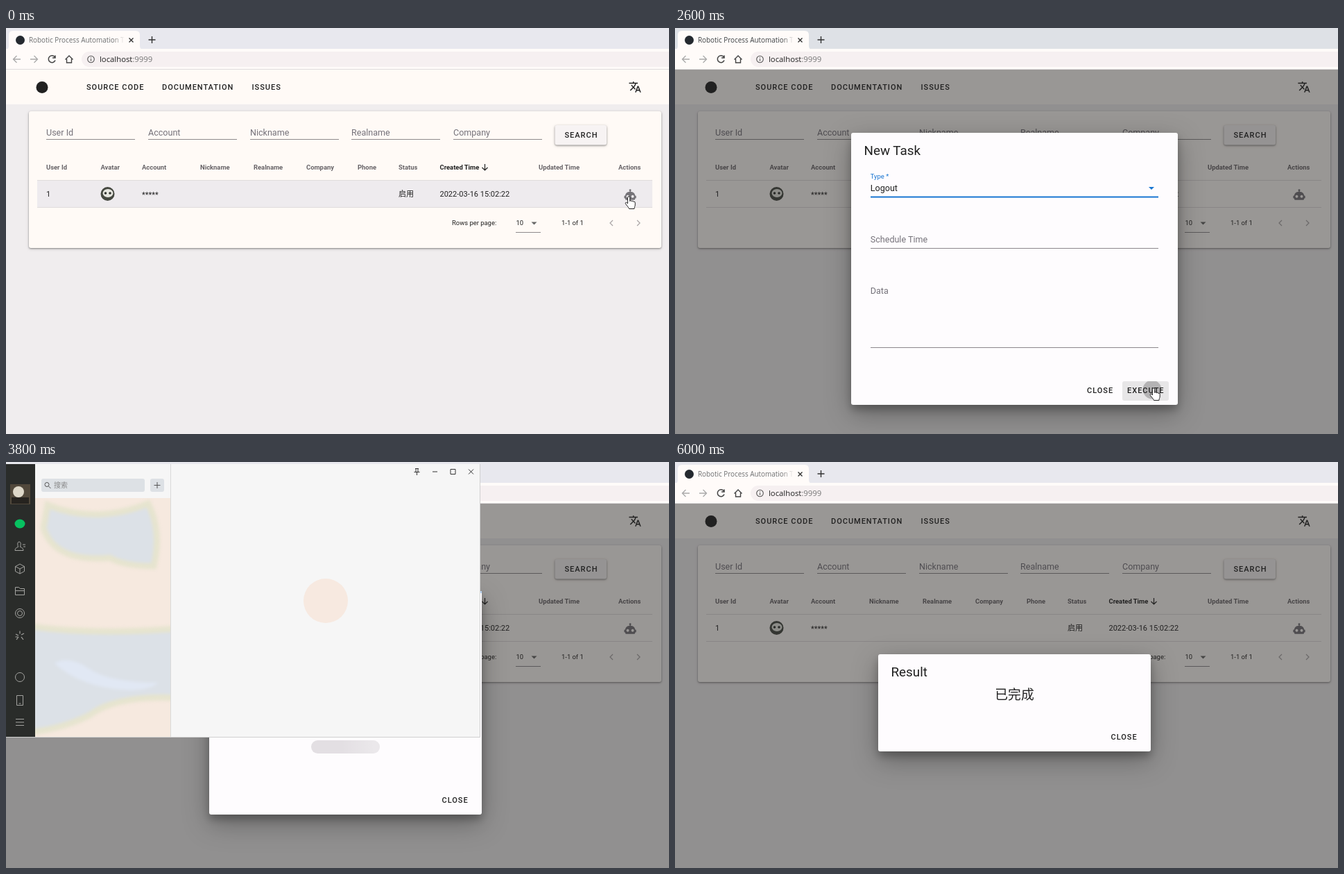
Animation of 956x585 px, one loop 8 s. Source, as an HTML page:

```html
<!DOCTYPE html>
<html lang="en">
<head>
<meta charset="utf-8">
<title>Robotic Process Automation</title>
<style>
html, body { margin: 0; height: 100%; overflow: hidden; background: #f0edee; }
svg { display: block; width: 100vw; height: 100vh; }
text { font-family: Roboto, "Noto Sans CJK SC", "Noto Sans CJK", sans-serif; white-space: pre; }
.ui { font-family: "Open Sans", "Noto Sans CJK SC", "Noto Sans CJK", sans-serif; }
.btn { font-weight: 500; letter-spacing: .98px; }
.card { filter: drop-shadow(0 1px 1px rgba(0,0,0,.38)) drop-shadow(0 1px 2px rgba(0,0,0,.14)); }
.paper { filter: drop-shadow(0 7px 6px rgba(0,0,0,.24)) drop-shadow(0 11px 18px rgba(0,0,0,.3)); }
.menu { filter: drop-shadow(0 3px 4px rgba(0,0,0,.3)); }
.soft { filter: blur(2px); }
</style>
</head>
<body>
<svg id="stage" viewBox="0 0 956 585"></svg>
<script>
const $ = id => document.getElementById(id);
const INK = '#212121', GREY = '#75727a', BLUE = '#1976d2';

// Markup helpers; text is placed by the middle of its capitals
const text = (x, y, size, str, fill = INK, more = '') =>
  `<text x="${x}" y="${y + size * .356}" font-size="${size}" fill="${fill}" ${more}>${str}</text>`;
const rect = (x, y, w, h, fill, more = '') =>
  `<rect x="${x}" y="${y}" width="${w}" height="${h}" fill="${fill}" ${more}/>`;
const line = (d, stroke, width = 1, more = '') =>
  `<path d="${d}" fill="none" stroke="${stroke}" stroke-width="${width}" ${more}/>`;
const shape = (d, fill, more = '') => `<path d="${d}" fill="${fill}" ${more}/>`;
const disc = (x, y, r, fill, more = '') => `<circle cx="${x}" cy="${y}" r="${r}" fill="${fill}" ${more}/>`;
const ring = (x, y, r, stroke, width = 1) => disc(x, y, r, 'none', `stroke="${stroke}" stroke-width="${width}"`);
const button = (x, y, str, more = '') => text(x, y, 11, str, INK, `class="btn" ${more}`);
const title = (x, y, str) => text(x, y, 18.84, str);
const label = (x, y, str, more = '') => text(x, y, 12.56, str, GREY, more);
const icon = (x, y, d, fill) => shape(d, fill, `transform="translate(${x - 9.4} ${y - 9.4}) scale(.785)" fill-rule="evenodd"`);
const group = (id, body, more = '') => `<g id="${id}" ${more}>${body}</g>`;

const ROBOT = 'M12 2a2 2 0 0 1 1 3.7V7h1a7 7 0 0 1 7 7h1a1 1 0 0 1 1 1v3a1 1 0 0 1-1 1h-1v1a2 2 0 0 1-2 2H5a2 2 0 0 1-2-2v-1H2a1 1 0 0 1-1-1v-3a1 1 0 0 1 1-1h1a7 7 0 0 1 7-7h1V5.7A2 2 0 0 1 12 2M7.5 13a2.5 2.5 0 1 0 .01 0M16.5 13a2.5 2.5 0 1 0 .01 0Z';
const TRANSLATE = 'M12.9 15.1L10.3 12.6Q13 9.700 14.1 6H17V4H10V2H8V4H1V6H12.200Q11.200 9 9 11.400Q7.600 9.900 6.700 8H4.700Q5.800 10.500 7.700 12.600L2.600 17.600L4 19L9 14L12.100 17.100ZM18.500 10H16.500L12 22H14L15.100 19H19.900L21 22H23ZM15.900 17L17.500 12.700L19.100 17Z';

function chrome() {
  return rect(0, 0, 956, 31, '#dee1e6', 'id="strip"') +
    shape('M0 31Q4 31 4 26V10Q4 4 10 4H187Q193 4 193 10V26Q193 31 198 31Z', '#fffbf9') +
    rect(0, 30, 956, 30, '#fffbf9') + rect(109, 34, 860, 22, '#f6f0f1', 'rx="11"') +
    rect(0, 59, 956, 1, '#dfdcdd') +
    disc(20.5, 17.5, 6.5, '#24292f') +
    text(33, 17.5, 9.9, 'Robotic Process Automation T', 'url(#fade)', 'class="ui" id="tabTitle"') +
    line('M177.500 14.500l6 6m0-6l-6 6M205.500 17h10m-5-5v10', '#333', 1.4) +
    line('M21 45H10.500m5-5l-5 5l5 5M35 45H45.500m-5-5l5 5l-5 5', '#aaa', 1.3) +
    line('M70.500 42A5 5 0 1 0 71 46.500M71 39.500V43H67', '#444', 1.5) +
    line('M85.500 45.500L91 40l5.500 5.500M87.500 44.500V50H94.500V44.500', '#444', 1.4) +
    ring(122.5, 45, 4.8, '#555', 1.1) + line('M122.500 44.500v3M122.500 42.200v1', '#555', 1.2) +
    text(135, 45, 11.3, 'localhost<tspan fill="#777">:9999</tspan>', INK, 'class="ui"');
}

function page() {
  const fields = ['User Id', 'Account', 'Nickname', 'Realname', 'Company'].map((s, i) => {
    const x = 58 + Math.round(i * 146.8);
    return label(x, 150.5, s) + rect(x, 160, 128, 1, '#8e8a8c');
  });
  const heads = [[58, 'User Id'], [136.5, 'Avatar'], [196, 'Account'], [280, 'Nickname'], [357, 'Realname'],
    [433, 'Company'], [507, 'Phone'], [566, 'Status'], [625.5, 'Created Time'], [768, 'Updated Time'], [883, 'Actions']]
    .map(([x, s]) => text(x, 201, 9.42, s, s[0] == 'C' && s[1] == 'r' ? INK : '#676367', 'font-weight="700"'));
  return rect(0, 110, 956, 475, '#f0edee') + rect(0, 60, 956, 50, '#fffaf6') +
    disc(52, 85.5, 8.5, INK) +
    button(116, 85, 'SOURCE CODE') + button(225, 85, 'DOCUMENTATION') + button(354.5, 85, 'ISSUES') +
    icon(907, 85, TRANSLATE, INK) +
    rect(33, 120, 912, 197, '#fffaf6', 'rx="3" class="card"') + fields.join('') +
    rect(791.5, 140, 74.5, 28.5, '#f7f3f3', 'rx="3" class="card"') + button(805.5, 154, 'SEARCH') +
    heads.join('') + line('M690.500 196v9m-4-4l4 4l4-4', INK, 1.2) +
    rect(45, 220, 887, 38, '#eeebee', 'id="rowHover"') +
    rect(45, 219, 887, 1, '#e0dcdc') + rect(45, 258, 887, 1, '#e0dcdc') +
    text(58, 239, 11, '1') +
    disc(146.5, 239, 10, '#454840') + `<ellipse cx="147" cy="238" rx="7.500" ry="6" fill="#e6e6df"/>` +
    disc(143.5, 238, 1.8, '#30322e') + disc(150, 238, 1.8, '#30322e') +
    text(196, 240, 11, '*****') + text(566, 239, 11, '启用') + text(625.5, 239, 11, '2022-03-16 15:02:22') +
    icon(900, 240, ROBOT, '#757378') +
    text(643, 281, 9.42, 'Rows per page:') + text(735.5, 281, 9.42, '10') + rect(735, 294, 36, 1, '#8e8a8c') +
    shape('M757.500 279.500h8l-4 4z', '#666') + text(801, 281, 9.42, '1-1 of 1') +
    line('M875 277l-4 4l4 4M910 277l4 4l-4 4', '#aaa5a6', 1.2);
}

const ITEMS = ['Login', 'Logout', 'Send Private Messages', 'Send Group Messages', 'Add Contacts', 'Post Moments'];
const paper = (x, y, w, h) => rect(x, y, w, h, '#fefcfe', 'rx="3" class="paper"');

function dialogs() {
  const task = paper(254, 151, 471, 392) + title(272.5, 176, 'New Task') +
    label(281.8, 231, 'Type *', 'id="typeLabel"') + text(281.8, 231, 12.56, 'Logout', INK, 'id="typeValue"') +
    rect(282, 243, 415, 1, '#8c888c', 'id="typeLine"') + shape('M683 229h8l-4 4z', '#666', 'id="typeArrow"') +
    label(281.8, 304.5, 'Schedule Time') + rect(282, 317, 415, 1, '#8c888c') +
    label(281.8, 378.5, 'Data') + rect(282, 460, 415, 1, '#8c888c') +
    button(594, 522.5, 'CLOSE') +
    rect(645, 509, 67, 28, '#e7e6e7', 'rx="3" id="execHover"') +
    disc(688, 521, 0, 'rgba(0,0,0,.22)', 'id="ripple" clip-path="url(#execClip)"') +
    button(652, 522.5, 'EXECUTE', 'id="exec"') +
    group('menu', rect(282, 217, 415, 239, '#fff', 'rx="3" class="menu"') +
      rect(282, 261, 415, 38, '#eeeeee', 'id="itemHover"') +
      ITEMS.map((s, i) => text(294.5, 242.5 + i * 37.7, 12.56, s)).join(''));
  const skeleton = (x, y, w, h, r) => rect(x, y, w, h, '#e3dfe3', `rx="${r}"`) +
    rect(x, y, w, h, 'url(#shine)', `rx="${r}"`);
  const waiting = paper(293, 186, 393, 322) +
    rect(293, 186, 393, 3, '#b9d4f2') +
    `<g clip-path="url(#barClip)">${rect(0, 186, 0, 3, BLUE, 'id="long"')}${rect(0, 186, 0, 3, BLUE, 'id="short"')}</g>` +
    title(311.5, 211, 'Waiting') + skeleton(379, 232, 220.5, 157, 3) + skeleton(440, 401, 99, 19, 9.5) +
    button(628.5, 487, 'CLOSE');
  const result = paper(293, 277, 393, 140) + title(311.5, 302, 'Result') +
    text(489.5, 335, 18.84, '已完成', INK, 'text-anchor="middle"') + button(628.5, 396, 'CLOSE');
  return group('task', task) + group('waiting', waiting) + group('result', result);
}

function chatWindow() {
  const c = '#a3a3a0';
  const side = rect(0, 3, 42, 394, '#2a2c2a') +
    rect(6, 32, 29, 29, '#51483b') + disc(18, 43, 8, '#ded8c9') + rect(8, 51, 25, 9, '#26231f') +
    `<ellipse cx="20" cy="89" rx="7.500" ry="6.500" fill="#07c160"/>` +
    line('M13 127.500q0-4 4.500-5q-2-7.500 1.500-7.500t1.500 7.500q4.500 1 4.500 5zM24 119h4m-3 3h3', c) +
    line('M20 147l6.500 3.500v7l-6.500 3.500l-6.500-3.500v-7zM13.500 150.500l6.500 3.500l6.500-3.500M20 154v7', c) +
    line('M13.500 191.500v-11h5l2 2h6v9zM13.500 185.500h13', c) +
    ring(20, 218, 6.5, c) + ring(20, 218, 3.5, c) +
    line('M20 243.500v4M26 247l-4 2M25 256l-3-4M15 256l3-4M14 248l4 2M13.500 252h4', c, 1.2) +
    ring(20, 310, 6.5, c) +
    line('M15.500 336.500h9v14h-9zM18.500 348h3M14 370.500h12m-12 4.500h12m-12 4.500h12', c);
  const list = rect(42, 52, 196, 345, '#f6e9df') +
    `<g clip-path="url(#listClip)"><g class="soft" stroke="#e6e4cf" stroke-width="9" fill="#dce1e7">
      <path d="M60 62Q130 90 205 60Q225 100 213 150Q170 150 150 138Q70 145 54 95Z"/>
      <path d="M30 236Q120 250 250 240V340Q160 335 120 365Q80 385 30 390Z"/>
      <path d="M70 290q20-12 50 8t100 20q-20 16-70 8t-80-36z" fill="#e1e8f4" stroke="none"/></g></g>`;
  return rect(0, 3, 684, 394, '#f6f6f6') + list + side +
    rect(51, 24, 149, 19, '#dde1e5', 'rx="3"') + rect(208, 24, 20, 19, '#dde1e5', 'rx="3"') +
    ring(59, 32.5, 3, '#555') + line('M61.500 35l3 3M213.500 33.500h9m-4.500-4.500v9', '#555') +
    text(69, 33.5, 10, '搜索', '#888', 'class="ui"') +
    rect(237, 3, 1, 394, '#d9d9d9') + disc(461, 200, 32, '#f7e9e0') +
    line('M590 9.500h5M591 10v4M594 10v4M588.500 14.500h8M592.500 15v4M615 14h7M641 10.500h7v7h-7zM667 10.500l7 7m0-7l-7 7', '#333') +
    line('M0 396.500H683.500V3', '#d0d0d0');
}

$('stage').innerHTML = `<defs>
  <linearGradient id="fade" gradientUnits="userSpaceOnUse" x1="155" x2="171"><stop stop-color="#3c4043"/><stop offset="1" stop-color="#3c4043" stop-opacity="0"/></linearGradient>
  <linearGradient id="shine"><stop stop-color="#fff" stop-opacity="0"/><stop offset=".5" stop-color="#fff" stop-opacity=".3"/><stop offset="1" stop-color="#fff" stop-opacity="0"/></linearGradient>
  <clipPath id="execClip">${rect(645, 509, 67, 28, '#000')}</clipPath>
  <clipPath id="barClip">${rect(293, 186, 393, 3, '#000')}</clipPath>
  <clipPath id="listClip">${rect(42, 52, 195, 344, '#000')}</clipPath></defs>` +
  page() + rect(0, 60, 956, 525, INK, 'id="scrim"') + dialogs() + chrome() + group('chat', chatWindow()) +
  group('cursor', shape('M0 0V13L3 10.300L5 15L7 14.200L5 9.600H9.300Z', '#fff', 'stroke="#222" id="arrow"') +
    shape('M-1.600 10V1.400a1.600 1.600 0 0 1 3.200 0V6.500a1.500 1.500 0 0 1 2.800.4a1.500 1.500 0 0 1 2.700.6a1.400 1.400 0 0 1 2.100 1V12c0 2-1.300 3-1.300 5.500H.5C-.3 15-3.300 12.500-4.600 10.300c-.9-1.600.7-2.600 2-1.500z', '#fff', 'stroke="#222" id="hand"'));

const clamp = v => Math.max(0, Math.min(1, v));
const mix = (a, b, v) => a + (b - a) * v;
const set = (id, attrs) => { for (const k in attrs) $(id).setAttribute(k, attrs[k]); };
const show = (id, on) => set(id, { opacity: +on });

// Cubic bezier easing, solved by bisection
const bezier = (x1, y1, x2, y2) => v => {
  v = clamp(v);
  if (v == 0 || v == 1) return v;
  const at = (a, b, s) => 3 * a * s * (1 - s) ** 2 + 3 * b * s * s * (1 - s) + s ** 3;
  let lo = 0, hi = 1;
  for (let i = 0; i < 24; i++) {
    const mid = (lo + hi) / 2;
    at(x1, x2, mid) < v ? lo = mid : hi = mid;
  }
  return at(y1, y2, lo);
};
const swift = bezier(.25, .8, .25, 1), ease = bezier(.25, .1, .25, 1);

// Scale and fade around (cx, cy)
function pop(id, t, start, end, cx, cy) {
  const v = swift((t - start) / 300) * (1 - swift((t - end) / 300)), s = .5 + v / 2;
  set(id, { opacity: v, transform: `translate(${cx * (1 - s)} ${cy * (1 - s)}) scale(${s})` });
}

function bar(id, left, right) {
  set(id, { x: 293 + left * 393, width: Math.max(0, right - left) * 393 });
}

const TRAIL = [[0, 898, 243], [210, 898, 243], [400, 801, 244], [800, 405, 232], [1050, 405, 232],
  [1400, 403, 292], [1750, 403, 292], [2150, 617, 436], [2500, 690, 519], [8000, 690, 519]];

function moveCursor(t) {
  const i = TRAIL.findIndex(p => p[0] > t), a = TRAIL[i - 1], b = TRAIL[i];
  const v = (t - a[0]) / (b[0] - a[0]);
  const hand = t < 260 || t > 740 && t < 1850 || t > 2420 && t < 2760;
  set('cursor', { transform: `translate(${mix(a[1], b[1], v)} ${mix(a[2], b[2], v)})` });
  show('cursor', t < 3500);
  show('hand', hand);
  show('arrow', !hand);
}

function draw(t) {
  const active = t >= 200 && t < 3500, focus = t >= 1000, chosen = t >= 1750;
  set('strip', { fill: active ? '#dee1e6' : '#e8e8ee' });
  set('tabTitle', { opacity: active ? 1 : .75 });
  show('rowHover', t < 230);
  set('scrim', { opacity: .46 * swift((t - 220) / 200) });

  pop('task', t, 230, 2640, 489.5, 347);
  pop('waiting', t, 2745, 5350, 489.5, 347);
  pop('result', t, 5450, 9000, 489.5, 347);
  pop('menu', t, 1020, 1780, 282, 217);

  const lift = swift((t - 1000) / 300);
  set('typeLabel', { 'font-size': mix(12.56, 9.42, lift), y: mix(235.5, 217.4, lift), fill: focus ? BLUE : GREY });
  set('typeLine', { height: focus ? 2 : 1, y: focus ? 242.5 : 243, fill: focus ? BLUE : '#8c888c' });
  set('typeArrow', { fill: focus ? BLUE : '#666' });
  show('typeValue', chosen);
  show('itemHover', t > 1220);
  set('exec', { 'fill-opacity': chosen ? 1 : .28 });
  show('execHover', t > 2420);
  set('ripple', { r: Math.max(0, t - 2540) * .22 });

  // Two-part progress bar: the short run first, then the long one; it rests near the end
  const run = clamp((Math.min(t, 4876) - 2720) / 2200);
  const first = ease(run / .6), second = ease((run - .6) / .4);
  bar('short', mix(-2, 1.07, first), mix(0, 1.08, first));
  bar('long', mix(-.9, 1, second), mix(0, 1.35, second));
  const sweep = Math.max(0, t - 2720) % 1500 / 750 - 1;
  set('shine', { x1: sweep, x2: sweep + 1 });

  set('chat', { opacity: t < 5200 ? clamp((t - 3480) / 150) : 0 });
  moveCursor(t);
}

const begin = performance.now();
function tick() {
  draw((performance.now() - begin) % 8000);
  requestAnimationFrame(tick);
}
tick();
</script>
</body>
</html>
```
